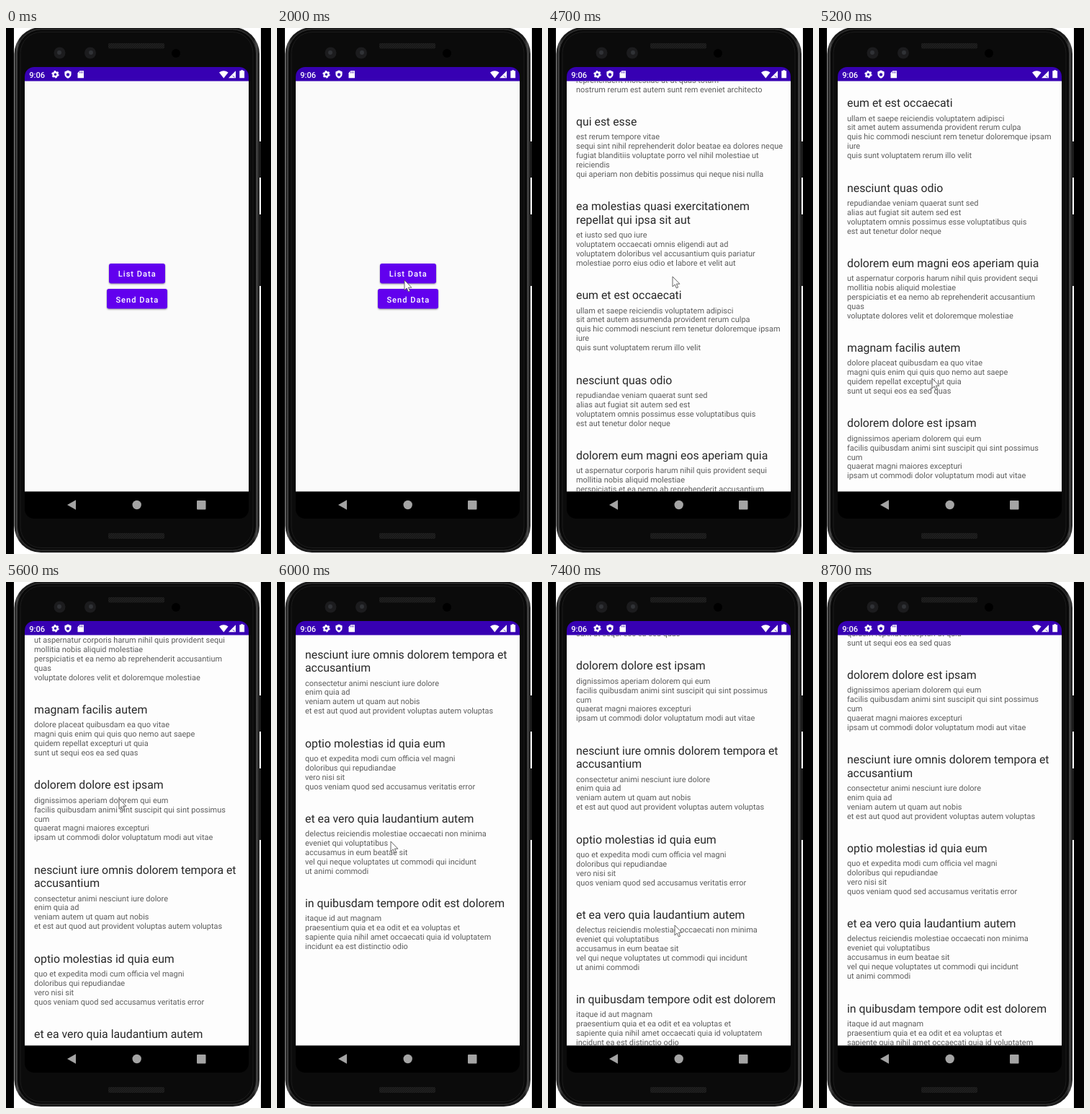
An HTML page for the animation above (8800 ms loop, 368 by 728 pixels).

```html
<!DOCTYPE html>
<html lang="en">
<head>
<meta charset="utf-8">
<title>Phone list demo</title>
<style>
  html, body { margin: 0; width: 100%; height: 100%; overflow: hidden; background: #000; }
  svg { display: block; width: 368px; height: 728px; font-family: Roboto, sans-serif; text-rendering: geometricPrecision; }
  .title { font-size: 15.84px; fill: #272727; }
  .body { font-size: 10.95px; fill: #5c5c5c; }
  .label { font-size: 11.1px; font-weight: 500; letter-spacing: 1px; fill: #fff; text-anchor: middle; }
  .button { fill: #6200ee; filter: drop-shadow(0 1px 1px #0006); }
</style>
</head>
<body>
<svg viewBox="0 0 368 728">
  <defs>
    <linearGradient id="rim">
      <stop offset="0" stop-color="#161616"/>
      <stop offset=".012" stop-color="#4a4a4a"/>
      <stop offset=".025" stop-color="#1a1a1a"/>
      <stop offset=".975" stop-color="#1a1a1a"/>
      <stop offset=".988" stop-color="#4a4a4a"/>
      <stop offset="1" stop-color="#161616"/>
    </linearGradient>
    <pattern id="mesh" width="3" height="3" patternUnits="userSpaceOnUse">
      <rect width="3" height="3" fill="#171717"/>
      <path d="M0 3 3 0" stroke="#242424"/>
    </pattern>
    <clipPath id="screen"><rect x="26" y="54" width="311" height="625" rx="13"/></clipPath>
    <clipPath id="content"><rect x="26" y="73.5" width="311" height="568"/></clipPath>
  </defs>

  <rect x="11" width="343" height="728" fill="#fff"/>
  <path d="M350 157h4v50h-4zM350 258h4v99h-4z" fill="#1c1c1c"/>
  <rect x="11.5" y="-1" width="340.5" height="727" rx="37" fill="url(#rim)"/>
  <rect x="15.5" y="2" width="332" height="721" rx="33" fill="#090909" stroke="#3a3a3a"/>
  <rect x="20" y="5.5" width="323" height="714" rx="29" fill="#0b0b0b" stroke="#1d1d1d"/>
  <g fill="url(#mesh)">
    <rect x="142" y="21" width="78" height="7.5" rx="2"/>
    <rect x="142" y="699" width="78" height="8" rx="2"/>
  </g>
  <g fill="#1c1c1e">
    <circle cx="74.5" cy="34.5" r="8"/><circle cx="117" cy="34.5" r="8"/>
  </g>
  <g fill="#303236">
    <circle cx="74" cy="34" r="3"/><circle cx="118" cy="34" r="3"/>
  </g>
  <circle cx="236" cy="35" r="6" fill="#000"/>

  <g clip-path="url(#screen)">
    <rect x="26" y="54" width="311" height="625"/>
    <rect id="page" x="26" y="73" width="311" height="568.5" fill="#fafafa"/>
    <rect x="26" y="54" width="311" height="19.5" fill="#3700b3"/>
  </g>

  <g fill="#fff">
    <text x="32.3" y="68.5" font-size="11.1" font-weight="500">9:06</text>
    <circle cx="68.5" cy="64.2" r="3" fill="none" stroke="#fff" stroke-width="2.4"/>
    <circle cx="68.5" cy="64.2" r="4.5" fill="none" stroke="#fff" stroke-width="1.5" stroke-dasharray="2.3 2.41"/>
    <path d="M86 58.6l4.6 2v3.2q0 4-4.6 6-4.6-2-4.6-6v-3.2z"/>
    <path d="M102.3 59.2h5.7v10h-8.5v-7z"/>
    <path d="M302.3 69.5 296 61.6q6.3-4.6 12.6 0z"/>
    <path d="M309 69.2 319 59.2v10z"/>
    <path d="M326.3 59.2v-1h2.8v1h2v10h-6.8v-10z"/>
  </g>
  <path d="M86 62l2.4 1.8-.9 2.8h-3l-.9-2.8z" fill="#3700b3"/>
  <path d="M102.5 60.5v2M104.5 60.5v2M106.3 60.5v2M314.6 66l3 2.3" stroke="#3700b3" stroke-width=".8"/>

  <g fill="#a4a4a4">
    <path d="M85 660l12-6.7v13.4z"/>
    <circle cx="181.7" cy="660" r="6.2"/>
    <rect x="265" y="654" width="12.5" height="12.5" rx="1"/>
  </g>

  <g id="menu">
    <rect class="button" x="143" y="326" width="78" height="27.5" rx="3"/>
    <text class="label" x="182.3" y="344.3">List Data</text>
    <rect class="button" x="140" y="361" width="84" height="27.5" rx="3"/>
    <text class="label" x="182.3" y="379.5">Send Data</text>
  </g>
  <g clip-path="url(#content)"><g id="list"></g></g>
  <path id="cursor" d="M0 0v14l3.2-3 2.2 5 2.2-1-2.2-4.8h4.5z" fill="#fff" stroke="#555" stroke-width=".9" stroke-linejoin="round"/>
</svg>

<script>
// One post per row: title lines, then "|", then body lines; "/" breaks a line.
const posts = `sunt aut facere repellat provident/occaecati excepturi optio reprehenderit|quia et suscipit/suscipit recusandae consequuntur expedita et cum/reprehenderit molestiae ut ut quas totam/nostrum rerum est autem sunt rem eveniet architecto
qui est esse|est rerum tempore vitae/sequi sint nihil reprehenderit dolor beatae ea dolores neque/fugiat blanditiis voluptate porro vel nihil molestiae ut/reiciendis/qui aperiam non debitis possimus qui neque nisi nulla
ea molestias quasi exercitationem/repellat qui ipsa sit aut|et iusto sed quo iure/voluptatem occaecati omnis eligendi aut ad/voluptatem doloribus vel accusantium quis pariatur/molestiae porro eius odio et labore et velit aut
eum et est occaecati|ullam et saepe reiciendis voluptatem adipisci/sit amet autem assumenda provident rerum culpa/quis hic commodi nesciunt rem tenetur doloremque ipsam/iure/quis sunt voluptatem rerum illo velit
nesciunt quas odio|repudiandae veniam quaerat sunt sed/alias aut fugiat sit autem sed est/voluptatem omnis possimus esse voluptatibus quis/est aut tenetur dolor neque
dolorem eum magni eos aperiam quia|ut aspernatur corporis harum nihil quis provident sequi/mollitia nobis aliquid molestiae/perspiciatis et ea nemo ab reprehenderit accusantium/quas/voluptate dolores velit et doloremque molestiae
magnam facilis autem|dolore placeat quibusdam ea quo vitae/magni quis enim qui quis quo nemo aut saepe/quidem repellat excepturi ut quia/sunt ut sequi eos ea sed quas
dolorem dolore est ipsam|dignissimos aperiam dolorem qui eum/facilis quibusdam animi sint suscipit qui sint possimus/cum/quaerat magni maiores excepturi/ipsam ut commodi dolor voluptatum modi aut vitae
nesciunt iure omnis dolorem tempora et/accusantium|consectetur animi nesciunt iure dolore/enim quia ad/veniam autem ut quam aut nobis/et est aut quod aut provident voluptas autem voluptas
optio molestias id quia eum|quo et expedita modi cum officia vel magni/doloribus qui repudiandae/vero nisi sit/quos veniam quod sed accusamus veritatis error
et ea vero quia laudantium autem|delectus reiciendis molestiae occaecati non minima/eveniet qui voluptatibus/accusamus in eum beatae sit/vel qui neque voluptates ut commodi qui incidunt/ut animi commodi
in quibusdam tempore odit est dolorem|itaque id aut magnam/praesentium quia et ea odit et ea voluptas et/sapiente quia nihil amet occaecati quia id voluptatem/incidunt ea est distinctio odio`;

const $ = id => document.getElementById(id);
const TITLE_LINE = 18.7, BODY_LINE = 12.97, ITEM_GAP = 33.7;

function addLine(text, kind, y) {
  const line = document.createElementNS($('list').namespaceURI, 'text');
  line.setAttribute('class', kind);
  line.setAttribute('x', 39);
  line.setAttribute('y', y);
  line.textContent = text;
  $('list').append(line);
}

let itemTop = 0;
for (const post of posts.split('\n')) {
  const [titles, bodies] = post.split('|').map(part => part.split('/'));
  const bodyTop = itemTop + titles.length * TITLE_LINE;
  titles.forEach((text, i) => addLine(text, 'title', itemTop + 100.2 + i * TITLE_LINE));
  bodies.forEach((text, i) => addLine(text, 'body', bodyTop + 100.6 + i * BODY_LINE));
  itemTop = bodyTop + bodies.length * BODY_LINE + ITEM_GAP;
}

// Keys are [time, ...values], joined by straight segments.
const scrollKeys = [
  [4400, 0], [4700, 88], [4900, 235], [5000, 300], [5100, 338], [5200, 354],
  [5400, 354], [5500, 440], [5600, 620], [5800, 850], [5900, 900], [6000, 918],
  [6600, 918], [7000, 859.6], [7400, 785], [7800, 772.6]];
const cursorKeys = [
  [100, 290, 90], [400, 177, 349], [2300, 177, 349], [2500, 178, 360], [2800, 160, 390],
  [3000, 142, 454], [3300, 165, 492], [3700, 180, 480], [4400, 178, 432], [4700, 173, 344],
  [4900, 168, 225], [5200, 157, 485], [5400, 157, 485], [5600, 157, 300], [6000, 158, 359],
  [6600, 172, 342], [7000, 174, 400], [7400, 176, 475], [7800, 176, 487]];

function sample(keys, time) {
  const next = keys.findIndex(key => key[0] > time);
  if (next === 0) return keys[0].slice(1);
  if (next < 0) return keys.at(-1).slice(1);
  const from = keys[next - 1], to = keys[next];
  const part = (time - from[0]) / (to[0] - from[0]);
  return from.slice(1).map((value, i) => value + (to[i + 1] - value) * part);
}

const show = (id, visible) => $(id).setAttribute('visibility', visible ? 'visible' : 'hidden');

function draw() {
  const time = Math.floor(performance.now() % 8800 / 100) * 100;
  const listed = time >= 3800;
  show('menu', time < 2300);
  show('list', listed);
  show('cursor', time >= 100 && time < 7800);
  $('page').setAttribute('fill', listed ? '#fdfdfd' : '#fafafa');
  $('list').setAttribute('transform', `translate(0 ${-sample(scrollKeys, time)[0]})`);
  $('cursor').setAttribute('transform', `translate(${sample(cursorKeys, time)})`);
  requestAnimationFrame(draw);
}
draw();
</script>
</body>
</html>
```
